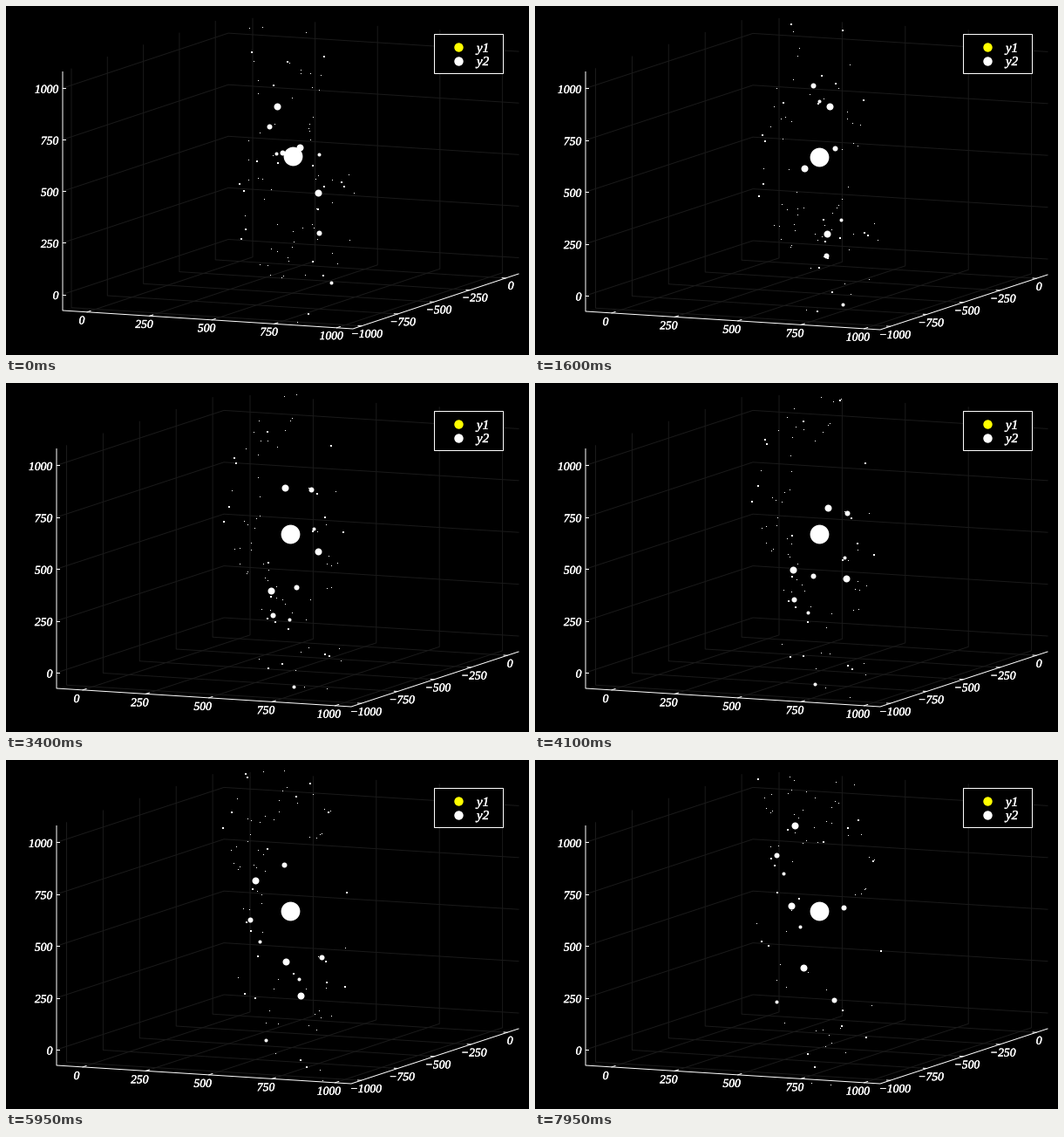
Animation, 600 px wide and 400 px high, one loop 8 s. Source, as a matplotlib script:

```python
import numpy as np
import matplotlib.pyplot as plt
from matplotlib.animation import FuncAnimation
from matplotlib.patches import Rectangle
from matplotlib.patheffects import withStroke

W, H, DPI = 600, 400, 100
FRAMES, INTERVAL = 160, 50
PX = 72 / DPI
GM, SPIN, SUBSTEPS = 36700, 40700, 2
TOP, BOTTOM = 11, 373

# Screen vectors of the orbital plane's two unit directions
PLANE = np.array([[-0.087, -0.0502], [0.0, -0.2377]])

# Starting places of the main bodies on screen, by dot diameter
MAIN = {
    8: [(337, 161.5), (357.5, 214), (311.3, 114.8)],
    6: [(302.3, 138.3), (317, 168), (359, 259.5)],
    4: [(309.5, 169), (359, 170), (372.5, 316.5)],
    2: [(275, 256), (270, 267), (282, 53)],
}
# Scattered small bodies: diameter, count, inner and outer radius
DUST = [(2, 18, 160, 760), (1, 60, 230, 810)]

# Layout of the first picture and of all later ones
FIRST = dict(origin=(65, 349), ex=(333, 21), ey=(190, -63), ez=(0, -273.5),
             x=(28, 71.6), y=(10, 41.3), z=(18.5, 59.1), sun=(329, 172),
             xlab=(87, 359.5), ylab=(414, 375))
REST = dict(origin=(58, 350), ex=(338, 21), ey=(192, -63), ez=(0, -274.5),
            x=(30, 72.4), y=(11.5, 41.9), z=(18, 59.4), sun=(326, 173),
            xlab=(81, 361), ylab=(413, 376))

fig = plt.figure(figsize=(W / DPI, H / DPI), dpi=DPI, facecolor='black')
ax = fig.add_axes([0, 0, 1, 1])
ax.set_xlim(0, W)
ax.set_ylim(H, 0)
ax.axis('off')


def line(points, color='white', z=1):
    xs, ys = zip(*points)
    return ax.plot(xs, ys, color=color, lw=PX, zorder=z)[0]


def label(x, y, text, ha='center', size=13.6):
    return ax.text(x, y, text, ha=ha, va='center_baseline', color='white',
                   family='Liberation Serif', style='italic', size=size * PX,
                   path_effects=[withStroke(linewidth=0.4 * PX,
                                            foreground='white')])


def dots(diameter, color='white', marker='o', z=3):
    return ax.scatter([], [], s=(diameter * PX) ** 2, c=color, marker=marker,
                      linewidths=0, zorder=z)


def draw_box(v):
    """Draw axes, grid and tick labels for one layout."""
    o, ex, ey, ez = (np.array(v[k], float)
                     for k in ('origin', 'ex', 'ey', 'ez'))
    ux, uy = ex / ex[0], ey / ey[0]
    art = []
    for k in range(5):
        px = ux * (v['x'][0] + k * v['x'][1])
        py = uy * (v['y'][0] + k * v['y'][1])
        pz = np.array([0, -(v['z'][0] + k * v['z'][1])])
        for path in ([o + px, o + px + ey, o + px + ey + ez],
                     [o + py + ex, o + py, o + py + ez],
                     [o + pz, o + pz + ey, o + pz + ey + ex]):
            art.append(line(path, '#1a1a1a'))
        art.append(line([o + px, o + px + uy * 4], z=2))
        art.append(line([o + ex + py, o + ex + py - ux * 4], z=2))
        art.append(line([o + pz, o + pz + (3, 0)], z=2))
        lx, ly = v['xlab']
        art.append(label(lx + k * v['x'][1], ly + k * 4.4, f'{250 * k}'))
        lx, ly = v['ylab']
        num = 1000 - 250 * k
        art.append(label(lx + k * 41.3, ly - k * 13.8,
                         f'\u2212{num}' if num else '0'))
        art.append(label(o[0] - 4.5, o[1] + pz[1] + 0.5, f'{250 * k}',
                         'right'))
    art.append(line([o + ez, o, o + ex, o + ex + ey], z=2))
    return art


def start_places():
    """Plane coordinates of every body, plus the dot diameter of each."""
    rng = np.random.default_rng(4)
    pos, size = [], []
    for d, pts in MAIN.items():
        pos.append((np.array(pts) - FIRST['sun']) @ np.linalg.inv(PLANE))
        size += [d] * len(pts)
    for d, n, inner, outer in DUST:
        r = rng.uniform(inner, outer, n)
        a = rng.uniform(0, 2 * np.pi, n)
        pos.append(np.column_stack([r * np.cos(a), r * np.sin(a)]))
        size += [d] * n
    return np.vstack(pos), np.array(size)


def simulate(p):
    """Explicit Euler steps, so the orbits slowly widen."""
    r = np.hypot(p[:, 0], p[:, 1])[:, None]
    vel = np.column_stack([-p[:, 1], p[:, 0]]) / r * np.sqrt(SPIN / r)
    dt = 1 / SUBSTEPS
    track = []
    for _ in range(FRAMES):
        track.append(p @ PLANE)
        for _ in range(SUBSTEPS):
            r = np.hypot(p[:, 0], p[:, 1])[:, None]
            acc = -GM * p / r ** 3
            p, vel = p + vel * dt, vel + acc * dt
    return np.array(track)


start, sizes = start_places()
track = simulate(start)
box_first, box_rest = draw_box(FIRST), draw_box(REST)

sun = dots(21.8)
groups = {d: dots(d, marker='s' if d < 3 else 'o') for d in (8, 6, 4, 2, 1)}

ax.add_patch(Rectangle((491, 32), 79, 45, fc='black', ec='white',
                       lw=PX, zorder=4))
for y, color, name in ((47.2, 'yellow', 'y1'), (62.5, 'white', 'y2')):
    dots(10.4, color, z=5).set_offsets([(518.5, y)])
    label(540, y + 0.5, name, 'left', 15).set_zorder(5)


def update(i):
    view = REST if i else FIRST
    for art in box_first:
        art.set_visible(i == 0)
    for art in box_rest:
        art.set_visible(i > 0)
    sun.set_offsets([view['sun']])
    pts = track[i] + view['sun']
    inside = (pts[:, 1] > TOP) & (pts[:, 1] < BOTTOM)
    for d, group in groups.items():
        p = pts[(sizes == d) & inside]
        if d == 1:
            p = np.floor(p) + 0.5
        elif d == 2:
            p = np.round(p)
        group.set_offsets(p.reshape(-1, 2))
    return [sun, *groups.values()]


anim = FuncAnimation(fig, update, frames=FRAMES, interval=INTERVAL,
                     repeat=True, repeat_delay=0, blit=False)
plt.show()
```
